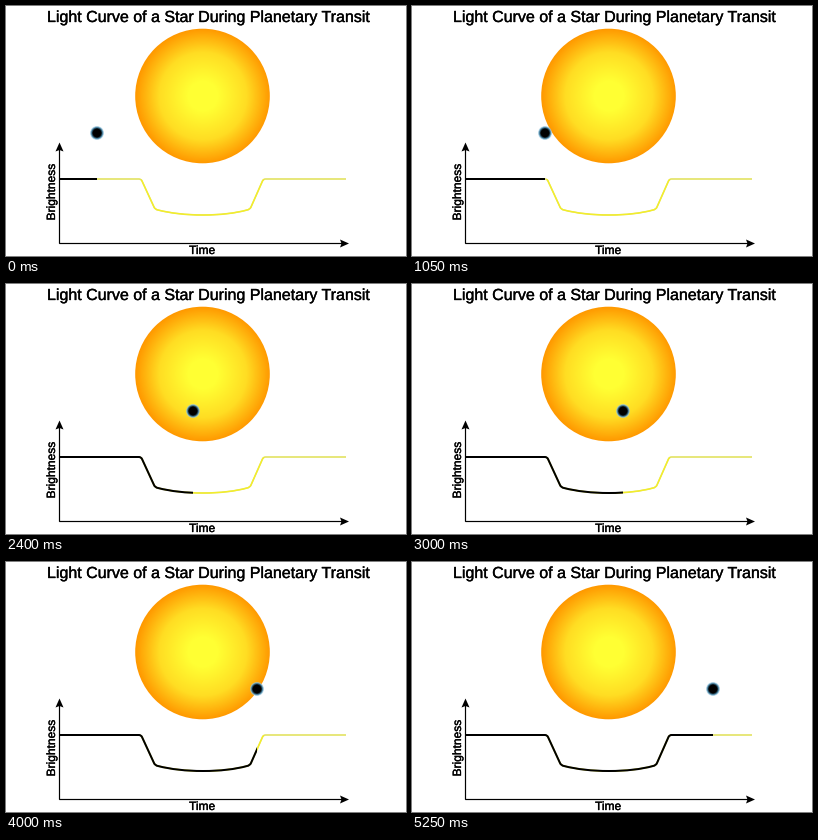
A matplotlib script that plays this animation: 400x250 px, repeating every 5300 ms.

```python
import numpy as np
import matplotlib.pyplot as plt
from matplotlib.animation import FuncAnimation
from matplotlib.colors import LinearSegmentedColormap
from matplotlib.patches import Circle, PathPatch, Polygon, Rectangle
from matplotlib.path import Path
from matplotlib.patheffects import withStroke

W, H, DPI = 400, 250, 100
PX = 72 / DPI  # points per pixel
FRAMES, INTERVAL = 106, 50
STAR, STAR_R = (196.5, 90), 67.3
PLANET_Y = 127

plt.rcParams["font.family"] = "Liberation Sans"
fig = plt.figure(figsize=(W / DPI, H / DPI), dpi=DPI, facecolor="white")
ax = fig.add_axes([0, 0, 1, 1])


def label(x, y, text, size, **kw):
    bold = withStroke(linewidth=0.35 * PX, foreground="black")
    ax.text(x, y, text, fontsize=size * PX, color="black", va="baseline",
            path_effects=[bold], **kw)


def draw_star():
    u = np.linspace(-1, 1, 560)
    half = 70  # a little larger than the disc that clips it
    dist = np.hypot(*np.meshgrid(u, u)) * half / STAR_R
    cmap = LinearSegmentedColormap.from_list(
        "star", [(0, "#ffff33"), (0.22, "#ffff33"), (0.65, "#ffdd23"), (1, "#ff9900")])
    cx, cy = STAR
    disc = ax.imshow(dist, cmap=cmap, vmin=0, vmax=1, aspect="auto",
                     extent=(cx - half, cx + half, cy + half, cy - half))
    disc.set_clip_path(Circle(STAR, STAR_R, transform=ax.transData))


def draw_axes():
    ax.plot([53, 53, 336], [144, 237, 237], color="black", lw=1.2 * PX,
            solid_joinstyle="miter")
    for head in ([(53.5, 136.5), (57.5, 145.5), (53.5, 144), (49.5, 145.5)],
                 [(343, 237.5), (334, 241.5), (335.5, 237.5), (334, 233.5)]):
        ax.add_patch(Polygon(head, fc="black", lw=0))


def light_curve():
    M, L, Q, C = Path.MOVETO, Path.LINETO, Path.CURVE3, Path.CURVE4
    steps = [
        (M, (53, 173)), (L, (133, 173)),
        (Q, (135, 173)), (Q, (136, 175)), (L, (148, 201)),
        (Q, (149, 203.5)), (Q, (152, 204)),
        (C, (165, 207.3)), (C, (180, 209)), (C, (197, 209)),
        (C, (214, 209)), (C, (229, 207.3)), (C, (241, 204)),
        (Q, (244, 203.5)), (Q, (245, 201)), (L, (256.5, 175)),
        (Q, (257.5, 173)), (Q, (259.5, 173)), (L, (340, 173)),
    ]
    codes, points = zip(*steps)
    return Path(points, codes)


def draw_curve(color, width):
    return ax.add_patch(PathPatch(light_curve(), fill=False, ec=color,
                                  lw=width * PX, capstyle="butt",
                                  joinstyle="round"))


def show_between(artist, x0, x1):
    artist.set_clip_path(Rectangle((x0, 0), x1 - x0, H, transform=ax.transData))


draw_star()
draw_axes()
ax.set(xlim=(0, W), ylim=(H, 0))
ax.axis("off")

label(41, 16, "Light Curve of a Star During Planetary Transit", 16)
label(183, 248, "Time", 12)
label(49, 186, "Brightness", 12, rotation=90, ha="center", rotation_mode="anchor")

draw_curve("#e2e25c", 1.6)
dip = draw_curve("#f4ee2a", 1.3)
show_between(dip, 135, 258)
trace = draw_curve("black", 2)

# Dark disc with a soft blue rim
rim = [(7, "#a9cfe4", 0.6), (6.4, "#5f9fc0", 0.75), (5.7, "#2c5a74", 0.8),
       (5, "#122632", 0.85), (4.3, "black", 1)]
planet = [ax.add_patch(Circle((0, PLANET_Y), r, fc=c, alpha=a, lw=0, zorder=5))
          for r, c, a in rim]


def update(i):
    x = 91 + 2 * i
    for ring in planet:
        ring.center = (x, PLANET_Y)
    show_between(trace, 0, x)
    return [trace, *planet]


anim = FuncAnimation(fig, update, frames=FRAMES, interval=INTERVAL,
                     repeat=True, repeat_delay=0)
plt.show()
```
